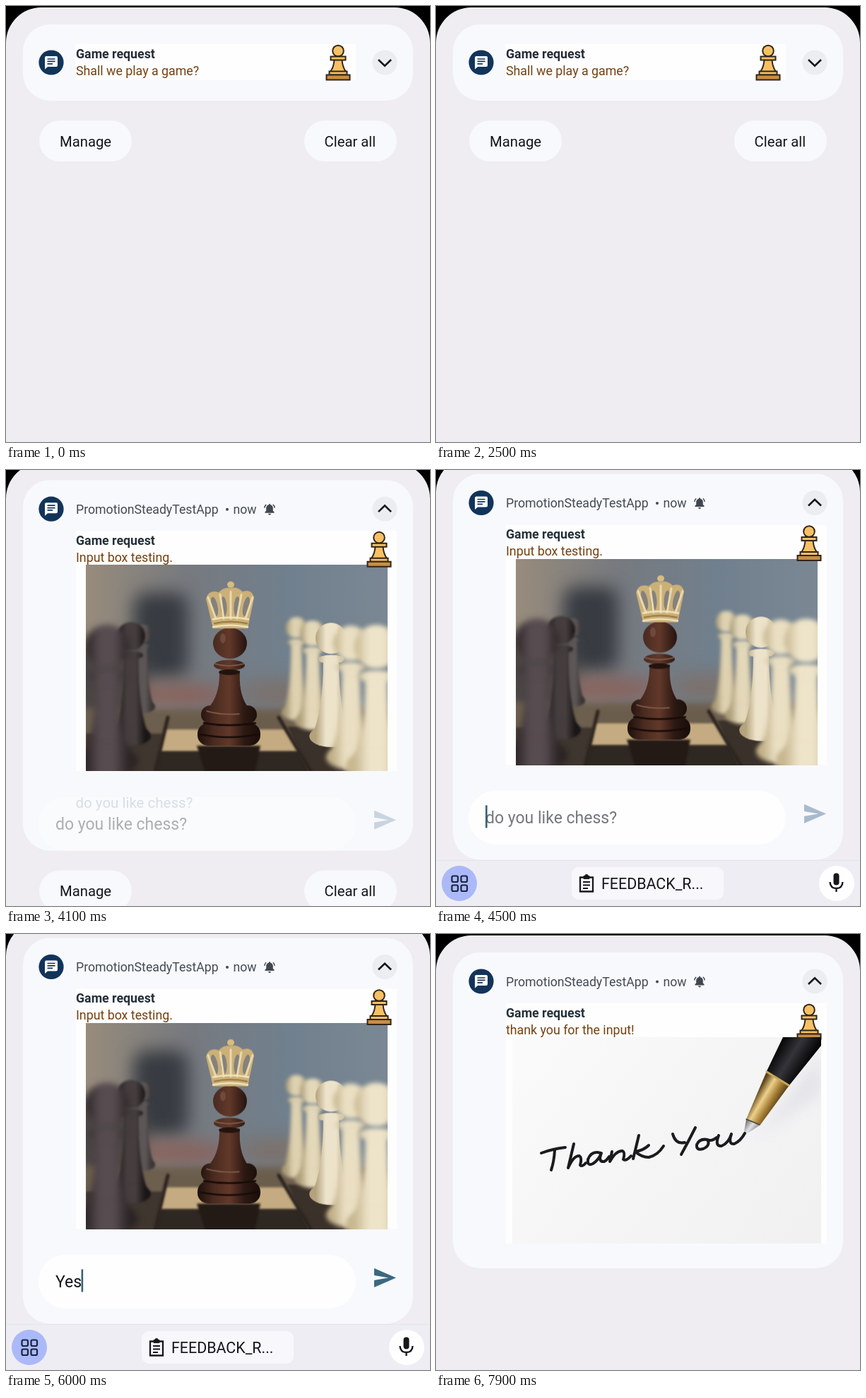
These frames come from a looping animation (600x617 px, 8 s). An HTML page with a canvas:

```html
<!DOCTYPE html>
<html lang="en">
<head>
<meta charset="utf-8">
<title>Game request notification</title>
<style>
  html, body { margin: 0; width: 100%; height: 100%; overflow: hidden; background: #000; }
  canvas { display: block; width: 600px; height: 617px; }
</style>
</head>
<body>
<canvas id="stage"></canvas>
<script>
const W = 600, H = 617, LOOP = 8000, STEP = 100, LIFT = 20.5;
const canvas = document.getElementById('stage');
const dpr = window.devicePixelRatio || 1;
canvas.width = W * dpr;
canvas.height = H * dpr;
let ctx = canvas.getContext('2d');

const NAVY = '#12345a', BROWN = '#75400f', INK = '#15171b', CARD = '#f7f9fd', PANEL = '#efedf2';

const clamp = v => Math.max(0, Math.min(1, v));
const ease = (t, start, len) => 1 - Math.pow(1 - clamp((t - start) / len), 3);
const mix = (a, b, p) => a + (b - a) * p;

function box(x, y, w, h, r, fill) {
  ctx.beginPath();
  ctx.roundRect(x, y, w, h, r);
  ctx.fillStyle = fill;
  ctx.fill();
}
function oval(x, y, rx, ry, fill) {
  ctx.beginPath();
  ctx.ellipse(x, y, rx, ry, 0, 0, Math.PI * 2);
  ctx.fillStyle = fill;
  ctx.fill();
}
function shape(d, fill) {
  ctx.fillStyle = fill;
  ctx.fill(new Path2D(d));
}
function line(d, color, width) {
  ctx.strokeStyle = color;
  ctx.lineWidth = width;
  ctx.stroke(new Path2D(d));
}
function text(s, x, y, size, color, weight = 400) {
  ctx.font = `${weight} ${size}px Roboto, Arial, sans-serif`;
  ctx.fillStyle = color;
  ctx.fillText(s, x, y);
}
function at(x, y, draw) {
  ctx.save();
  ctx.translate(x, y);
  draw();
  ctx.restore();
}
function faded(alpha, draw) {
  if (alpha <= 0) return;
  ctx.save();
  ctx.globalAlpha *= alpha;
  draw();
  ctx.restore();
}
function gradient(x0, y0, x1, y1, ...colors) {
  const g = ctx.createLinearGradient(x0, y0, x1, y1);
  colors.forEach((c, i) => g.addColorStop(i / (colors.length - 1), c));
  return g;
}

// Renders a still picture once, in card coordinates, clipped to its box.
function picture(x, y, w, h, draw) {
  const c = document.createElement('canvas'), main = ctx;
  c.width = w * dpr;
  c.height = h * dpr;
  ctx = c.getContext('2d');
  ctx.scale(dpr, dpr);
  ctx.translate(-x, -y);
  ctx.lineCap = ctx.lineJoin = 'round';
  draw();
  ctx = main;
  return () => ctx.drawImage(c, x, y, w, h);
}
function blur(px) { ctx.filter = px ? `blur(${px * dpr}px)` : 'none'; }

function chessman(x, y, r, foot, dark, light) {
  const fill = gradient(x - r, 0, x + r, 0, dark, light, light, dark);
  const neck = y + r * 1.35, waist = mix(neck, foot, .6), hip = foot - r * .7;
  shape(`M${x - r * .5} ${neck}H${x + r * .5}Q${x + r * .5} ${waist} ${x + r * 1.25} ${hip}H${x - r * 1.25}Q${x - r * .5} ${waist} ${x - r * .5} ${neck}`, fill);
  oval(x, y, r, r, fill);
  oval(x, neck, r * .85, r * .28, fill);
  oval(x, hip, r * 1.4, r * .7, fill);
}

const chessPhoto = picture(113, 146, 427, 292, () => {
  ctx.fillStyle = gradient(113, 0, 540, 0, '#988c7c', '#777a7f', '#71808e', '#7b8894');
  ctx.fillRect(113, 146, 427, 292);
  blur(12);
  box(180, 185, 78, 120, 20, '#383c42');
  oval(140, 310, 60, 60, '#4a4544');
  oval(245, 330, 75, 15, '#8a625b');
  oval(390, 328, 60, 22, '#7b726e');
  blur(4);
  shape('M90 350H560V460H90Z', '#6d5f4e');
  blur(1.5);
  shape('M232 362H384L390 378H226Z', '#6b5d4b');
  shape('M225 379H395L414 410H218Z', '#c4ab81');
  shape('M218 410H414L430 440H210Z', '#2f2721');
  shape('M270 402H360L352 440H282Z', '#231a16');
  shape('M113 385H222L210 440H113Z', '#3f362f');
  shape('M398 375H450L480 440H430Z', '#3a312a');
  line('M229 362L211 438M386 362L431 438', '#2b231e', 5);
  blur(1.5);
  chessman(193, 243, 13, 356, '#3c3536', '#5d5656');
  chessman(177, 247, 20, 402, '#1a1516', '#453d3e');
  blur(4);
  chessman(143, 262, 31, 446, '#2b2425', '#574c50');
  blur(2.5);
  chessman(411, 235, 15, 366, '#a99a76', '#ddd1b0');
  chessman(434, 243, 18, 380, '#ad9e79', '#e3d8b9');
  blur(.6);
  chessman(460, 250, 22, 404, '#b3a27b', '#ede3ca');
  blur(3);
  chessman(488, 257, 25, 436, '#c2b28a', '#eadfc3');
  chessman(524, 262, 31, 452, '#c8b891', '#eee4ca');
  blur(0);

  const wood = gradient(272, 0, 360, 0, '#1f110d', '#4a2b20', '#62392a', '#2c1812', '#190d0a');
  shape('M302 296H331Q329 326 340 344L349 356H281L290 344Q303 326 302 296Z', wood);
  oval(317, 257, 24, 22, wood);
  oval(316, 288, 22, 7.5, wood);
  oval(316, 298, 15, 4, '#23130e');
  box(276, 345, 79, 26, 13, wood);
  box(271, 370, 89, 32, 15, wood);
  line('M280 370Q315 376 353 370M276 386Q315 394 355 386', '#170b08', 2.5);
  line('M295 286Q315 292 337 286M284 353Q305 359 330 357', '#84604d', 1.5);
  oval(307, 250, 4, 7, '#6d4a3b');

  shape('M293 236L283 194Q287 180 301 185Q309 177 317 179Q327 176 335 184Q348 179 351 193L342 236Z', '#cbb078');
  for (const [x, tilt] of [[295, -.2], [308, -.06], [327, .06], [340, .2]]) {
    ctx.beginPath();
    ctx.ellipse(x, 205, 4.5, 14, tilt, 0, Math.PI * 2);
    ctx.fillStyle = '#85817c';
    ctx.fill();
  }
  line('M286 192L297 222M303 188L308 222M318 184V222M333 188L327 222M349 192L339 222', '#e9d9ad', 3);
  line('M293 223Q317 218 343 223M293 234Q317 229 342 234', '#f2e5bf', 2.5);
  line('M295 229Q317 224 341 229', '#94733a', 2);
  oval(318, 174, 5, 4.5, '#d9bd7e');
});

const thanksPhoto = picture(108, 146, 437, 292, () => {
  ctx.fillStyle = gradient(150, 146, 500, 438, '#fafafa', '#f5f5f6', '#f1f1f2');
  ctx.fillRect(108, 146, 437, 292);
  blur(10);
  shape('M545 170L470 268L450 290L545 225Z', '#e3e3e8');
  blur(0);
  shape('M491 146H545V158L500 214L468 194Z', gradient(480, 165, 520, 190, '#050506', '#34343a', '#08080a'));
  shape('M468 194L500 214L459 270L439 262Z', gradient(452, 228, 482, 246, '#5f4518', '#eed08a', '#a47d35', '#4d3714'));
  shape('M439 262L459 270Q448 278 435 285Z', gradient(438, 265, 455, 278, '#6d6d70', '#e2e2e4', '#77777a'));
  line('M468 195L499 214', '#caa559', 3);
  line('M439 262L458 270', '#4b4437', 1.5);
  line('M149 310Q165 304 183 302M168 306Q167 322 163 334' +
    'M195 297Q190 318 187 331Q195 313 203 314Q207 317 204 327Q207 330 212 324' +
    'M233 310Q220 306 215 319Q214 329 222 325Q230 320 234 310Q229 323 238 322Q242 320 245 315' +
    'M249 308L246 322Q255 306 264 307Q268 309 265 319Q269 322 276 314' +
    'M287 285Q283 302 279 318M301 299Q294 306 282 308Q291 316 301 316Q314 313 322 300' +
    'M335 283Q339 298 352 295M367 274Q357 294 347 312' +
    'M384 291Q373 289 369 298Q368 307 378 304Q389 299 384 291Q390 294 397 288' +
    'M400 285Q394 301 404 300Q414 296 418 283Q413 298 422 297Q431 293 437 282', '#1b1b1d', 4);
});

function appIcon(x, y) {
  at(x, y, () => {
    oval(0, 0, 17.6, 17.6, NAVY);
    shape('M-7 -9H7Q9 -9 9 -7V4Q9 6 7 6H-5L-9 9.5V-7Q-9 -9 -7 -9Z', '#fff');
    line('M-5.5 -5H5.5M-5.5 -1.6H5.5M-5.5 1.8H2', NAVY, 1.7);
  });
}

function chevron(x, y, flip) {
  at(x, y, () => {
    oval(0, 0, 17.6, 17.6, '#ecedf1');
    ctx.scale(1, mix(1, -1, flip));
    line('M-9 -4L0 4.8L9 -4', INK, 2.6);
  });
}

function pawn(x, y) {
  at(x, y, () => {
    const edge = '#33251a', gold = '#f6c164';
    const part = (d, fill) => { shape(d, fill); line(d, edge, 2); };
    oval(0, 9.5, 8.8, 8.8, edge);
    oval(0, 9.5, 6.8, 6.8, gold);
    part('M-5.5 22H5.5Q6 32 11 39H-11Q-6 32 -5.5 22Z', gold);
    part('M-10.5 17.5H10.5V22.5H-10.5Z', gold);
    part('M-12.5 38.5H12.5V43.5H-12.5Z', gold);
    part('M-16.5 43.5H16.5V50.5H-16.5Z', '#c78f43');
  });
}

function bell(x, y) {
  at(x, y, () => {
    shape('M-6.5 5V3.5L-4.8 2V-2Q-4.5 -5.6 -1.2 -6.3Q-1 -8 0 -8Q1 -8 1.2 -6.3Q4.5 -5.6 4.8 -2V2L6.5 3.5V5ZM-2 6H2Q1.7 8 0 8Q-1.7 8 -2 6Z', '#42474f');
    line('M-7.2 -2Q-7 -5 -4.8 -6.8M7.2 -2Q7 -5 4.8 -6.8', '#42474f', 1.4);
  });
}

function pillButton(label, x, y, tx) {
  box(x, y - 29, 131, 58, 29, CARD);
  text(label, tx, y + 7.5, 20.3, INK);
}

function collapsedBody() {
  ctx.fillStyle = '#fefefe';
  ctx.fillRect(98, 54, 397, 51);
  text('Game request', 99, 74, 17.8, '#252b38', 700);
  text('Shall we play a game?', 99, 97.5, 17.8, BROWN);
  pawn(470, 54);
}

function expandedBody(thanks) {
  text('PromotionSteadyTestApp', 99, 73.5, 17.7, '#454a52');
  oval(313, 67.5, 2, 2, '#454a52');
  text('now', 321.5, 73.5, 17.7, '#454a52');
  bell(373, 67.5);
  ctx.fillStyle = '#fefefe';
  ctx.fillRect(99, 98, 454, 340);
  text('Game request', 99, 117.5, 17.8, '#24303a', 700);
  text(thanks ? 'thank you for the input!' : 'Input box testing.', 99, 141.5, 17.8, BROWN);
  if (thanks) { pawn(528, 98); thanksPhoto(); }
  else { chessPhoto(); pawn(528, 98); }
}

const typedAt = t => t >= 5700 ? 'Yes' : t >= 5500 ? 'Ye' : t >= 5200 ? 'Y' : '';
function caretOn(t) {
  if (t < 4300 || t >= 7400) return false;
  const last = t >= 5700 ? 5700 : t >= 5500 ? 5500 : t >= 5200 ? 5200 : 4300;
  return (t - last) % 1000 < 500;
}

function replyField(t) {
  const typed = typedAt(t);
  box(46, 474.5, 449, 76, 38, '#fefefe');
  text(typed || 'do you like chess?', 70, 520.5, 23, typed ? INK : '#74777c');
  if (caretOn(t)) {
    const x = typed ? 69.4 + ctx.measureText(typed).width : 70;
    ctx.fillStyle = '#37607a';
    ctx.fillRect(x, 495, 2.6, 32);
  }
  shape('M521 493.5L552 507L521 520.5V510.5L541 507L521 503.5Z', typed ? '#3d687f' : '#a9bacb');
}

function toolbar() {
  ctx.fillStyle = '#efedf4';
  ctx.fillRect(0, 553, W, 400);
  ctx.fillStyle = '#e5e4ea';
  ctx.fillRect(0, 552, W, 1);
  oval(33, 585, 25, 25, '#abb9f8');
  for (const x of [22.5, 35.5]) for (const y of [574.5, 587.5]) {
    ctx.beginPath();
    ctx.roundRect(x, y, 8.5, 8.5, 2);
    ctx.strokeStyle = '#1b2440';
    ctx.lineWidth = 2.2;
    ctx.stroke();
  }
  box(192, 562, 215, 46, 10, '#f8f8fc');
  line('M204 576.5H222V596.5H204Z', INK, 2.3);
  box(208.5, 574, 9, 5, 1, INK);
  oval(213, 574.5, 2.6, 2.6, INK);
  line('M208 583H218M208 587.5H218M208 592H215', INK, 2);
  text('FEEDBACK_R...', 234, 593, 21.4, INK);
  oval(567, 585, 25, 25, '#fefefe');
  box(562.5, 570.5, 8, 17, 4, INK);
  line('M557.5 583Q558 592 566.5 592Q575 592 575.5 583M566.5 592V597', INK, 2.4);
}

function render(t) {
  const open = ease(t, 3100, 400);
  const leave = ease(t, 7300, 300);
  const reply = ease(t, 4000, 400);
  const keys = reply * (1 - leave);
  const thanks = t >= 7700;
  let bottom = mix(mix(134, 521, open), 572, reply);
  if (thanks) bottom = mix(572, 473, ease(t, 7600, 300));

  ctx.setTransform(dpr, 0, 0, dpr, 0, 0);
  ctx.lineCap = 'butt';
  ctx.lineJoin = 'miter';
  ctx.fillStyle = '#000';
  ctx.fillRect(0, 0, W, H);

  at(0, -LIFT * keys, () => {
    box(0, 2, W, 720, 50, PANEL);
    if (!thanks) {
      pillButton('Manage', 47, bottom + 57, 76);
      pillButton('Clear all', 422, bottom + 57, 450.5);
    }
    ctx.save();
    box(24, 26, 552, bottom - 26, 38, CARD);
    ctx.clip();
    const headY = mix(80, 67, open);
    faded(1 - open * 1.3, collapsedBody);
    faded(open, () => expandedBody(thanks));
    appIcon(64, headY);
    chevron(536, headY, open);
    if (!thanks) {
      faded(open * (1 - reply), () => text('do you like chess?', 98.5, 490, 20.5, '#34597a'));
      faded(reply, () => replyField(t));
    }
    ctx.restore();
  });
  if (keys > 0) at(0, (1 - keys) * 300, toolbar);
}

const began = performance.now();
function tick() {
  const t = (performance.now() - began) % LOOP;
  render(Math.floor(t / STEP) * STEP);
  requestAnimationFrame(tick);
}
tick();
</script>
</body>
</html>
```
